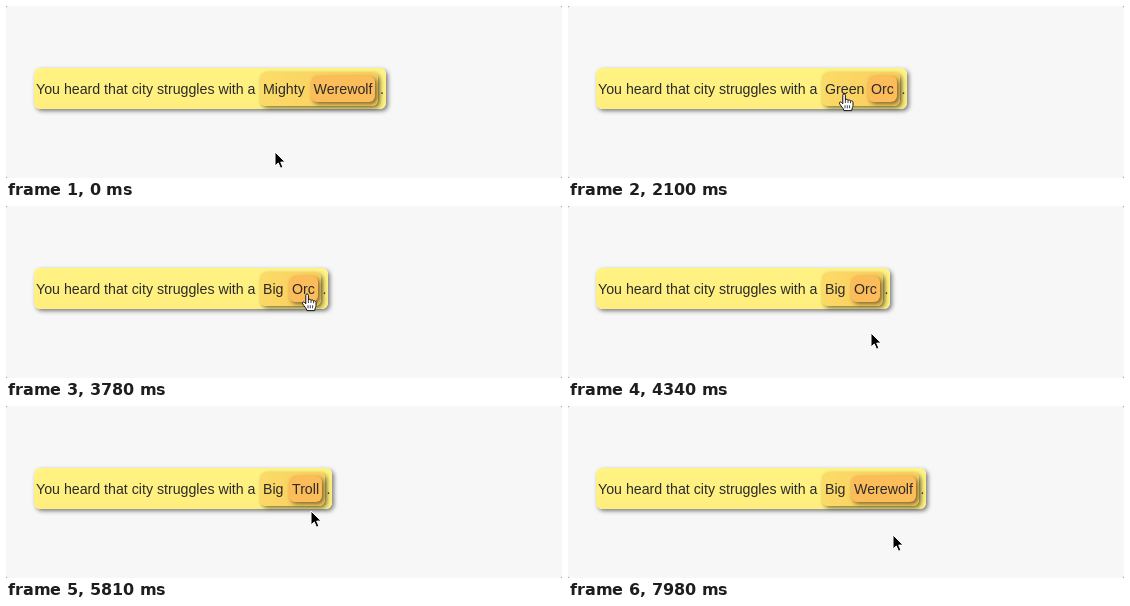
Recreate the animation shown at these times as an HTML page. Size 556 by 172 pixels, loop 8000 ms.

```html
<!DOCTYPE html>
<html lang="en">
<head>
<meta charset="utf-8">
<title>Reroll</title>
<style>
  html, body { margin: 0; width: 100%; height: 100%; overflow: hidden; background: #8a8a8a; }
  #stage {
    position: relative; width: 556px; height: 172px; overflow: hidden;
    background: #f7f7f7; border-radius: 2px;
    font: 14.2px/20px "Liberation Sans", Arial, sans-serif; color: #2b2b2b;
  }
  #stage * { position: absolute; box-sizing: border-box; white-space: pre; }
  .card { border-radius: 6px; box-shadow: 2px 2px 4px rgba(0, 0, 0, .5); }
  #sentence { left: 28px; top: 62px; height: 41px; background: linear-gradient(#fff384, #ffee7d); }
  #phrase { left: 254px; top: 66px; height: 34px; background: linear-gradient(115deg, #fbdc68, #fbca5c); }
  #noun { top: 70px; height: 26px; padding: 3px; background: #fcbc59; }
  .word { top: 73px; }
  #menu {
    left: 302px; top: 82px; width: 159px; height: 83px; background: #fff;
    border: 1px solid #ccc; border-radius: 4px; box-shadow: 0 3px 8px rgba(0, 0, 0, .17);
  }
  #menu span { left: 19px; }
  #menu i { left: 0; right: 0; top: 40px; height: 1px; background: #dedede; }
  svg { left: 0; top: 0; overflow: visible; }
</style>
</head>
<body>
<div id="stage">
  <div id="sentence" class="card"></div>
  <div id="phrase" class="card"></div>
  <span class="word" style="left:30px">You heard that city struggles with a</span>
  <span class="word" id="adjective" style="left:257px"></span>
  <div id="noun" class="card"></div>
  <span class="word" id="dot">.</span>
  <div id="menu">
    <span style="top:8px">Reroll</span><i></i><span style="top:53px">Change text</span>
  </div>
  <svg id="arrow" width="14" height="20">
    <path d="M0 0V14L3.3 11L5.5 16.2L7.9 15.2L5.7 10.1H10.2Z" fill="#000" stroke="#fff" stroke-linejoin="round"/>
  </svg>
  <svg id="hand" width="16" height="18">
    <path d="M-1.2 9.8V1.2C-1.2-.4 1.4-.4 1.4 1.2V6C1.8 4.8 3.8 5 4 6.5C4.6 5.5 6.3 5.8 6.5 7.1C7.4 6.4 9 7 9 8.4V11.5C9 13.2 8 13.8 7.7 16.6H0C-.6 14.2-2.8 12.6-4.4 9.8C-5.2 8.2-3.5 7.4-2.5 8.5Z" fill="#fff" stroke="#111" stroke-linejoin="round"/>
    <path d="M1.4 6V9M4 6.5V9M6.5 7.1V9.2M1 11.3V14.3M3.3 11.3V14.3M5.6 11.3V14.3" fill="none" stroke="#111" stroke-width=".8"/>
  </svg>
</div>
<script>
const LOOP = 8000, STEP = 70;
const APPROACH = 420, PAUSE = 140, RETREAT = 560;
const $ = id => document.getElementById(id);

const nounLeft = { Mighty: 307.5, Green: 303, Big: 286 };
const adjectiveSpot = [276, 88], nounSpot = [301, 88], menuCorner = [302, 83];

// The pointer glides to aim, clicks, then withdraws to rest.
const visits = [
  { click: 560, aim: adjectiveSpot, rest: [275, 134], words: ['Green', 'Orc'] },
  { click: 2240, aim: adjectiveSpot, rest: [275, 115], words: ['Big', 'Troll'] },
  { click: 3640, aim: nounSpot, rest: [303, 127], words: ['Big', 'Orc'] },
  { click: 5040, aim: nounSpot, rest: [305, 105], words: ['Big', 'Troll'] },
  { click: 6440, aim: menuCorner, rest: menuCorner, words: ['Big', 'Troll'], menu: true },
  { click: 7140, aim: [321, 90], rest: [325, 129], words: ['Big', 'Werewolf'] }
];
const opening = { rest: [269, 146], words: ['Mighty', 'Werewolf'] };

function ease(t, from, duration) {
  const u = Math.min(1, Math.max(0, (t - from) / duration));
  return u * u * (3 - 2 * u);
}

const mix = (a, b, k) => a.map((v, i) => v + (b[i] - v) * k);

function pointerAt(t) {
  return visits.reduce((p, { click, aim, rest }) => {
    const near = mix(p, aim, ease(t, click - PAUSE - APPROACH, APPROACH));
    return mix(near, rest, ease(t, click + PAUSE, RETREAT));
  }, opening.rest);
}

function show(id, on) {
  $(id).style.visibility = on ? 'visible' : 'hidden';
}

function draw(t) {
  const { words: [adjective, noun], menu = false } =
    visits.filter(v => v.click <= t).pop() || opening;
  const left = nounLeft[adjective] - 3;
  $('adjective').textContent = adjective;
  $('noun').textContent = noun;
  $('noun').style.left = left + 'px';
  const right = left + $('noun').offsetWidth;
  const phraseRight = right + 2.5;
  $('dot').style.left = right + 4.5 + 'px';
  $('phrase').style.width = phraseRight - 254 + 'px';
  $('sentence').style.width = right + 10 - 28 + 'px';
  show('menu', menu);

  const [x, y] = pointerAt(t);
  const hover = menu || (x > 254 && x < phraseRight && y > 66 && y < 100);
  show('hand', hover);
  show('arrow', !hover);
  for (const id of ['hand', 'arrow']) $(id).style.transform = `translate(${x}px, ${y}px)`;
}

const start = performance.now();
function tick() {
  const t = (performance.now() - start) % LOOP;
  draw(Math.floor(t / STEP) * STEP);
  requestAnimationFrame(tick);
}
tick();
</script>
</body>
</html>
```
